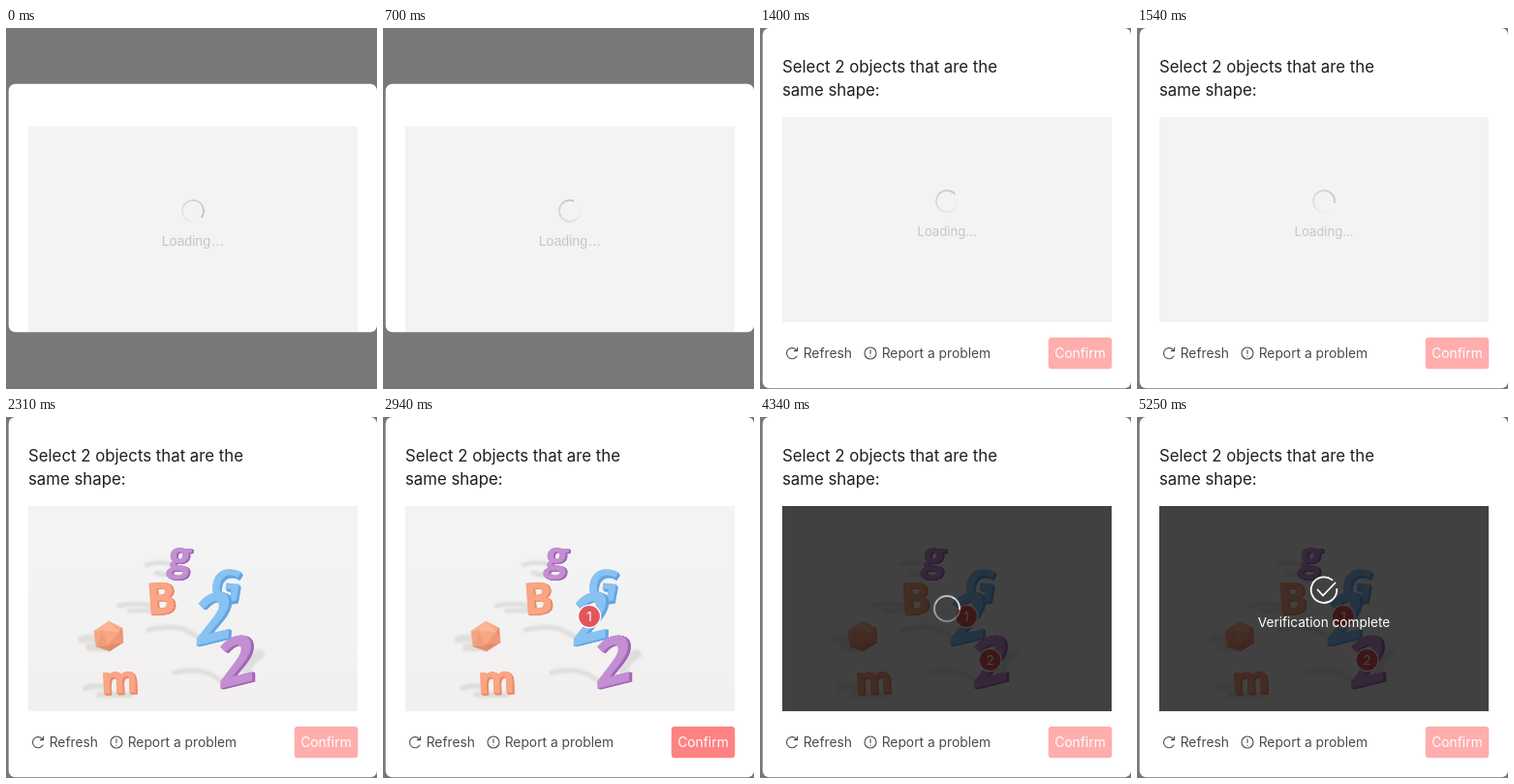
These frames come from a looping animation (383x373 px, 6.93 s). An HTML page:

```html
<!DOCTYPE html>
<html lang="en">
<head>
<meta charset="utf-8">
<title>Shape check</title>
<style>
  html, body { margin: 0; width: 100%; height: 100%; overflow: hidden; background: #787878; }
  svg { position: absolute; left: 0; top: 0; display: block; }
  text { font-family: Inter, "Noto Sans", sans-serif; font-size: 13.8px; }
  .title { font-size: 16.8px; fill: #1e1e20; }
  .link { fill: #4b4b4d; }
  .mid { text-anchor: middle; }
  .wait { font-size: 13.1px; fill: #c6c6c6; text-anchor: middle; }
  .wait.plain { font-family: "Liberation Sans", Arial, sans-serif; font-size: 14.2px; }
  .solid { font-family: "Open Sans", sans-serif; font-weight: 700; text-anchor: middle;
           stroke-width: .5; stroke-linejoin: round; }
  .icon { fill: none; stroke: #4b4b4d; stroke-width: 1.1; stroke-linecap: round; stroke-linejoin: round; }

  /* One 6930 ms clock drives everything. */
  .t { animation: 6930ms step-end -1ms infinite; }
  .small { animation-name: small; }
  .plain { animation-name: plain; }
  .webfont { animation-name: webfont; }
  .full { animation-name: full; }
  .loading { animation-name: loading; }
  .scene { animation-name: scene; }
  .pick1 { animation-name: pick1; }
  .pick2 { animation-name: pick2; }
  .button { animation-name: button; }
  .dim { animation-name: dim; }
  .done { animation-name: done; }

  @keyframes small { 0% { opacity: 1 } 20.2%, 100% { opacity: 0 } }
  @keyframes plain { 0% { opacity: 1 } 15.15%, 100% { opacity: 0 } }
  @keyframes webfont { 0% { opacity: 0 } 15.15%, 100% { opacity: 1 } }
  @keyframes full { 0% { opacity: 0 } 20.2%, 100% { opacity: 1 } }
  @keyframes loading { 0% { opacity: 0 } 20.2% { opacity: 1 } 30.3%, 100% { opacity: 0 } }
  @keyframes scene { 0% { opacity: 0 } 30.3% { opacity: .7 } 32.32% { opacity: .88 } 33.33%, 100% { opacity: 1 } }
  @keyframes pick1 { 0% { opacity: 0 } 42.42%, 100% { opacity: 1 } }
  @keyframes pick2 { 0% { opacity: 0 } 50.5%, 100% { opacity: 1 } }
  @keyframes button { 0% { fill: #ffadad } 42.42% { fill: #fe8281 } 43.43% { fill: #fd5757 } 62.62%, 100% { fill: #ffadad } }
  @keyframes dim { 0% { opacity: 0 } 62.62%, 100% { opacity: 1 } }
  @keyframes busy { 0% { opacity: 0 } 62.62% { opacity: 1 } 72.72%, 100% { opacity: 0 } }
  @keyframes done { 0% { opacity: 0 } 72.72% { opacity: .3 } 73.73% { opacity: .55 } 74.74% { opacity: .8 } 75.75%, 100% { opacity: 1 } }
  @keyframes turn { to { transform: rotate(2494.8deg) } }

  .spin {
    position: absolute; left: 181px; width: 24px; height: 24px; border-radius: 50%;
    background: conic-gradient(from var(--start), var(--tail) 8%, var(--head));
    --tail: #c2c2c200; --head: #bdbdbd;
    -webkit-mask: radial-gradient(closest-side, #0000 calc(100% - 2.1px), #000 calc(100% - 1.5px));
    mask: radial-gradient(closest-side, #0000 calc(100% - 2.1px), #000 calc(100% - 1.5px));
    animation: var(--show) 6930ms step-end -1ms infinite, turn 6930ms steps(99) -1ms infinite;
  }
  .s1 { top: 177px; --start: 130deg; --show: small; }
  .s2 { top: 167px; --start: 266deg; --show: loading; }
  .s3 { top: 184px; left: 179px; width: 28px; height: 28px; --start: 333deg; --show: busy;
        --tail: #ffffff50; --head: #fff; }
</style>
</head>
<body>
<svg width="383" height="373" viewBox="0 0 383 373">
  <defs>
    <linearGradient id="floor" x2="0" y2="1">
      <stop offset=".3" stop-color="#f3f3f3"/>
      <stop offset="1" stop-color="#f2f0ef"/>
    </linearGradient>
    <clipPath id="view"><rect x="23" y="92" width="340" height="212"/></clipPath>
  </defs>

  <g class="t small">
    <rect x="2.7" y="57.7" width="380.3" height="256.500" rx="7" fill="#fff"/>
    <rect x="23" y="101.5" width="340" height="212.5" fill="#f3f3f3"/>
    <text class="t wait plain" x="193" y="225">Loading…</text>
    <text class="t wait webfont" x="193" y="224.5">Loading...</text>
  </g>

  <g class="t full">
    <rect x="2.7" y="0" width="380.3" height="372.3" rx="7" fill="#fff"/>
    <text class="title" x="23" y="46">Select 2 objects that are the</text>
    <text class="title" x="23" y="70">same shape:</text>
    <rect x="23" y="92" width="340" height="212" fill="#f3f3f3"/>
    <text class="t wait loading" x="193" y="214.5">Loading...</text>

    <g clip-path="url(#view)">
      <g class="t scene">
        <rect x="23" y="92" width="340" height="212" fill="url(#floor)"/>
        <g fill="none" stroke="#dfdedd" stroke-linecap="round" style="filter:blur(.8px)">
          <path stroke-width="5" d="M145 153q14-5 28 0M155 161q10 3 18 2"/>
          <path stroke-width="5" d="M117 195q16-4 34 0M128 200h24"/>
          <path stroke-width="5" d="M147 220q26-6 40 1q9 5 18 10"/>
          <path stroke-width="5" d="M174 264q24-5 38 2q8 6 16 9"/>
          <path stroke-width="10" d="M248 262q5-14 14-17"/>
          <path stroke-width="8" d="M78 230q12-4 22 2M86 238h18"/>
          <path stroke-width="6" d="M82 280q12-4 22 0M96 287h32"/>
        </g>
        <g id="solids"></g>
      </g>
      <g class="t pick1"><g class="pin" transform="translate(213 206)"></g></g>
      <g class="t pick2"><g class="pin" transform="translate(237.5 251)"></g></g>
      <rect class="t dim" x="23" y="92" width="340" height="212" fill="#000" fill-opacity=".73"/>
    </g>

    <g class="t done">
      <g fill="none" stroke="#fff" stroke-width="1.8" stroke-linecap="round" stroke-linejoin="round">
        <path d="M201.5 168.4A13.3 13.3 0 1 0 206.3 178"/>
        <path d="M186.5 178.5L192 184.5L204.5 171.5"/>
      </g>
      <text class="mid" x="193" y="216.5" fill="#fff" style="font-size:13.6px">Verification complete</text>
    </g>

    <g class="icon">
      <path d="M38 339A5.6 5.6 0 1 1 37.6 332.8M38.6 330.3V333.6H35.3"/>
      <circle cx="114" cy="336" r="6"/>
      <path d="M114 332.7V336.4M114 339.1V339.2"/>
    </g>
    <text class="link" x="44.7" y="341">Refresh</text>
    <text class="link" x="125.7" y="341">Report a problem</text>
    <rect class="t button" x="297.7" y="319.7" width="65.6" height="32.6" rx="3.5"/>
    <text class="mid" x="330.5" y="341" fill="#fff">Confirm</text>
  </g>
</svg>
<div class="spin s1"></div>
<div class="spin s2"></div>
<div class="spin s3"></div>

<script>
  const add = (parent, tag, attrs, label = '') => {
    const el = document.createElementNS('http://www.w3.org/2000/svg', tag);
    for (const k in attrs) el.setAttribute(k, attrs[k]);
    el.textContent = label;
    return parent.appendChild(el);
  };
  const solids = document.getElementById('solids');

  // Extruded letter: shaded copies from the back, then the lit face.
  function letter(ch, x, y, size, drop, rotate, skew, [face, side], [dx, dy]) {
    const depth = 6;
    for (let i = depth; i >= 0; i--) {
      const color = i ? side : face;
      add(solids, 'text', {
        class: 'solid', y: size * drop, fill: color, stroke: color, style: `font-size:${size}px`,
        transform: `translate(${x + dx * i / depth} ${y + dy * i / depth}) rotate(${rotate}) skewX(${skew})`
      }, ch);
    }
  }

  const purple = ['#c48fd2', '#a267b8'];
  const orange = ['#faa585', '#e98c6b'];
  const blue = ['#88c2f2', '#64a5e2'];

  letter('g', 178.5, 152, 41, .15, 4, -4, purple, [2, 1]);
  letter('G', 227.5, 173.5, 45, .36, 6, -4, blue, [2, 3]);
  letter('B', 160, 187, 45, .36, -4, 0, orange, [2, 1]);
  letter('2', 214, 207, 67, .36, -14, -17, blue, [3, 1]);
  letter('2', 237.5, 251.5, 67, .36, -14, -14, purple, [3, 1]);
  letter('m', 117, 274.5, 39, .27, -2, 0, orange, [2, 2]);

  // Icosahedron: six rim points around one inner triangle.
  function icosahedron([n, ne, se, s, sw, nw], [a, b, c]) {
    const facets = [
      [a, b, c, '#f9a682'], [a, b, n, '#fdb595'], [b, n, ne, '#f9a985'], [b, ne, se, '#ea8f6b'],
      [b, c, se, '#f0987a'], [c, se, s, '#e48a6a'], [c, s, sw, '#e58c6b'],
      [c, a, sw, '#f19c78'], [a, sw, nw, '#f5a480'], [a, nw, n, '#fab08f']
    ];
    for (const [p, q, r, fill] of facets)
      add(solids, 'polygon', { points: [p, q, r].join(' '), fill, stroke: fill, 'stroke-width': .5 });
  }
  icosahedron([[106, 211], [120, 218], [121, 233], [107, 242], [93, 237], [91, 221]],
              [[99, 220], [117, 222], [105, 236]]);

  document.querySelectorAll('.pin').forEach((pin, i) => {
    add(pin, 'circle', { r: 11.6, fill: '#e4555a', stroke: '#fff', 'stroke-width': 1.4 });
    add(pin, 'text', { class: 'mid', y: 4.8, fill: '#fff', style: 'font-size:13.5px' }, i + 1);
  });
</script>
</body>
</html>
```
